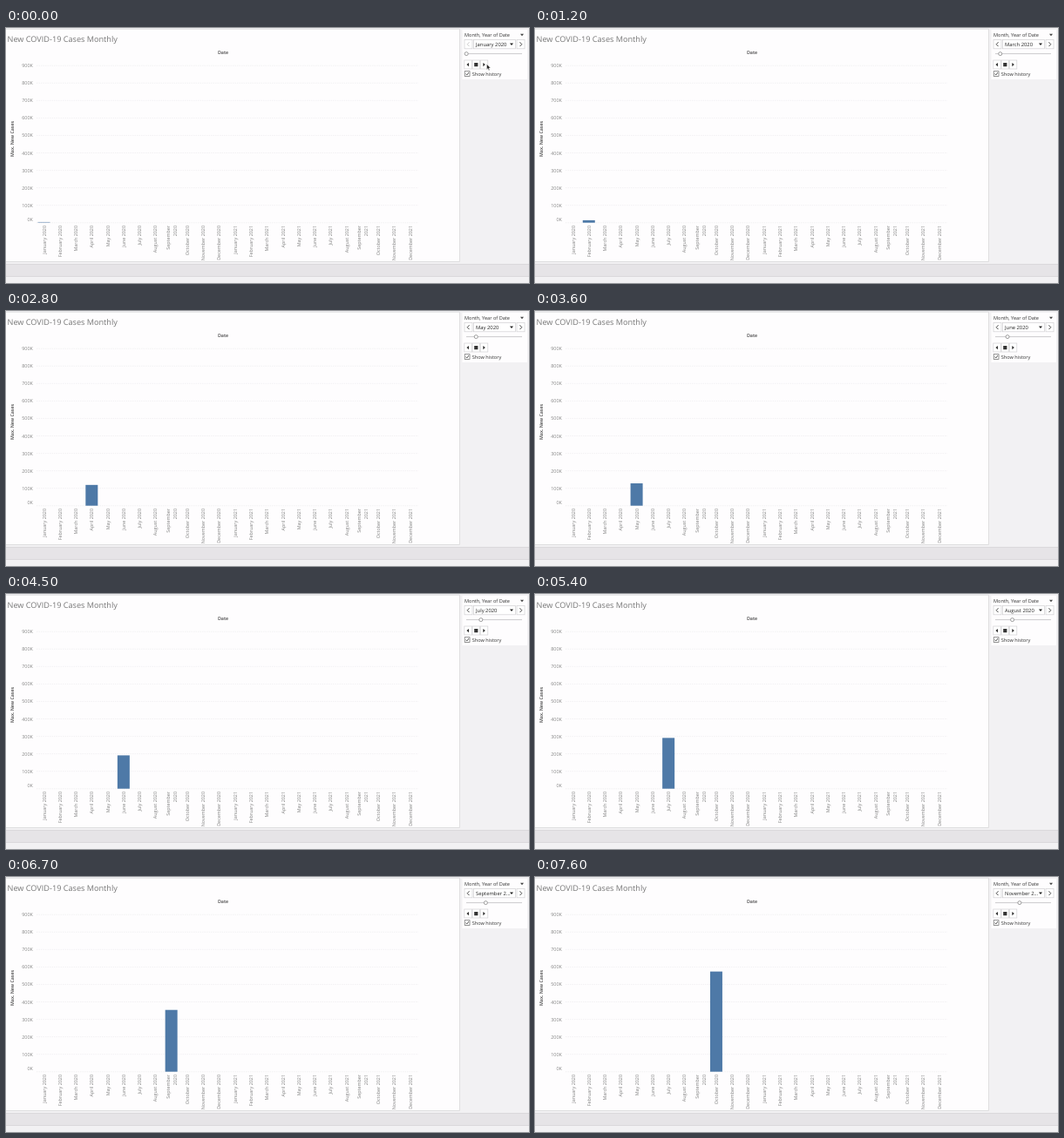
Recreate the animation shown at these times as an HTML page. Size 600 px wide and 293 px high, loop 8 s.

```html
<!DOCTYPE html>
<html lang="en">
<head>
<meta charset="utf-8">
<title>Monthly cases</title>
<style>
html, body { margin: 0; width: 100%; height: 100%; overflow: hidden; background: #f2f1f3; }
svg { display: block; width: 100vw; height: 100vh; }
text { font-family: "Open Sans", "Noto Sans", sans-serif; font-size: 5.5px; fill: #888; text-rendering: geometricPrecision; }
.title { font-size: 9.15px; fill: #777; }
.head { font-size: 5.3px; font-weight: 600; fill: #444; }
.month { font-size: 5.4px; fill: #808080; }
.ui { font-size: 5.6px; fill: #333; }
.value { font-size: 5.85px; fill: #222; }
.box { fill: #fff; stroke: #d2d1d3; stroke-width: .7; }
.grid { stroke: #eeecef; stroke-width: .7; stroke-dasharray: 1.5 1; }
.chevron { fill: none; stroke: #333; stroke-width: .9; }
</style>
</head>
<body>
<svg id="stage" viewBox="0 0 600 293" preserveAspectRatio="none">
  <rect width="600" height="293" fill="#f2f1f3"/>
  <rect y="1" width="520.5" height="267.5" fill="#fefdfe"/>
  <path d="M0 1.2H520.5V268.5H0" fill="none" stroke="#d9d8da" stroke-width=".8"/>
  <rect y="271.5" width="600" height="14" fill="#e6e4e7"/>
  <path d="M0 271.5H600M0 285.5H600" stroke="#d6d5d8" stroke-width=".8"/>
  <text class="title" x="1.5" y="16.4">New COVID-19 Cases Monthly</text>
  <text class="head" x="249" y="29.8" text-anchor="middle">Date</text>
  <text class="head" transform="translate(9.4 127.5) rotate(-90)" text-anchor="middle">Max. New Cases</text>
  <g id="axes"></g>
  <rect id="bar" width="14" fill="#4e79a7"/>

  <rect x="523.5" y="2" width="74.5" height="57" fill="#fefdfe"/>
  <text class="ui" x="526" y="9.6">Month, Year of Date</text>
  <path d="M590 6.8h4l-2 2.4z" fill="#444"/>
  <rect class="box" x="526" y="13.5" width="9" height="10.3"/>
  <rect class="box" x="536.5" y="13.5" width="48" height="10.3"/>
  <rect class="box" x="586" y="13.5" width="9" height="10.3"/>
  <path id="prev" class="chevron" d="M531.5 16.3l-2.3 2.4 2.3 2.4"/>
  <path class="chevron" d="M589.5 16.3l2.3 2.4-2.3 2.4"/>
  <text id="value" class="value" x="539" y="20.6"></text>
  <path d="M578 17.6h4l-2 2.5z" fill="#222"/>
  <path d="M528 29.6H592" stroke="#cccbcd" stroke-width="1"/>
  <circle id="knob" cy="29.6" r="2" fill="#fff" stroke="#777" stroke-width=".7"/>
  <rect class="box" x="525.8" y="37" width="8.6" height="10"/>
  <rect class="box" x="535" y="37" width="8.6" height="10"/>
  <rect class="box" x="544.2" y="37" width="8.6" height="10"/>
  <path d="M531 40v4.2l-2.6-2.1zM537.2 40h4.2v4.2h-4.2zM547.3 40v4.2l2.6-2.1z" fill="#333"/>
  <rect x="526.2" y="49.7" width="5.8" height="5.8" fill="#fff" stroke="#666" stroke-width=".7"/>
  <path d="M527.5 52.6l1.3 1.4 2.1-2.9" fill="none" stroke="#333" stroke-width=".8"/>
  <text class="ui" x="534.8" y="54.8">Show history</text>
  <path id="cursor" d="M0 0V6.2L1.4 4.9 2.4 7.2 3.4 6.8 2.4 4.6H4.4z" fill="#222" stroke="#fff" stroke-width=".4"/>
</svg>
<script>
const LOOP = 8000, BASE = 223.7, PITCH = 18.27;
const months = ["January", "February", "March", "April", "May", "June", "July",
  "August", "September", "October", "November", "December"];
const peaks = [3, 14, 75, 119, 128, 191, 291, 300, 354, 574]; // thousands
const barTimes = [0, 800, 2000, 2700, 3600, 4300, 5100, 6000, 6700, 7500];
const labelTimes = [0, 400, 900, 2000, 2800, 3600, 4400, 5200, 6000, 6800, 7600];

const $ = id => document.getElementById(id);
const centre = i => 43.5 + PITCH * i;
const stepAt = (times, t) => times.filter(s => s <= t).length - 1;

function add(tag, attrs, text = "") {
  const el = document.createElementNS($("stage").namespaceURI, tag);
  for (const key in attrs) el.setAttribute(key, attrs[key]);
  el.textContent = text;
  $("axes").append(el);
}

function addMonth(x, text) {
  add("text", { class: "month", "text-anchor": "end", transform: `translate(${x} 227) rotate(-90)` }, text);
}

function buildAxes() {
  for (let k = 0; k <= 9; k++) {
    const y = BASE - 20.05 * k;
    add("path", { class: "grid", d: `M35 ${y}H473` });
    add("text", { x: 31, y: (k ? y : 219.5) + 2, "text-anchor": "end" }, k ? `${k}00K` : "0K");
  }
  for (let i = 0; i < 24; i++) {
    const name = months[i % 12], year = 2020 + Math.floor(i / 12), x = centre(i) + 2;
    if (name === "September") {
      addMonth(x - 3.8, name);
      addMonth(x + 4, year);
    } else addMonth(x, `${name} ${year}`);
  }
}

function draw(t) {
  const b = stepAt(barTimes, t), m = stepAt(labelTimes, t);
  const height = Math.max(.8, peaks[b] * .2005);
  $("bar").setAttribute("x", centre(b) - 7);
  $("bar").setAttribute("y", BASE - height);
  $("bar").setAttribute("height", height);
  $("bar").setAttribute("opacity", b ? 1 : .65);

  // long names are cut off by the drop-down
  $("value").textContent = months[m] + (/mber$/.test(months[m]) ? " 2..." : " 2020");
  $("knob").setAttribute("cx", 528.2 + 2.77 * m);
  $("prev").style.stroke = m ? "#333" : "#c4c3c5";

  const p = Math.min(1, Math.max(0, (t - 700) / 500));
  $("cursor").setAttribute("transform", `translate(${551.5 + 30 * p} ${41.5 - 52 * p})`);
}

function tick() {
  draw(performance.now() % LOOP);
  requestAnimationFrame(tick);
}

buildAxes();
tick();
</script>
</body>
</html>
```
